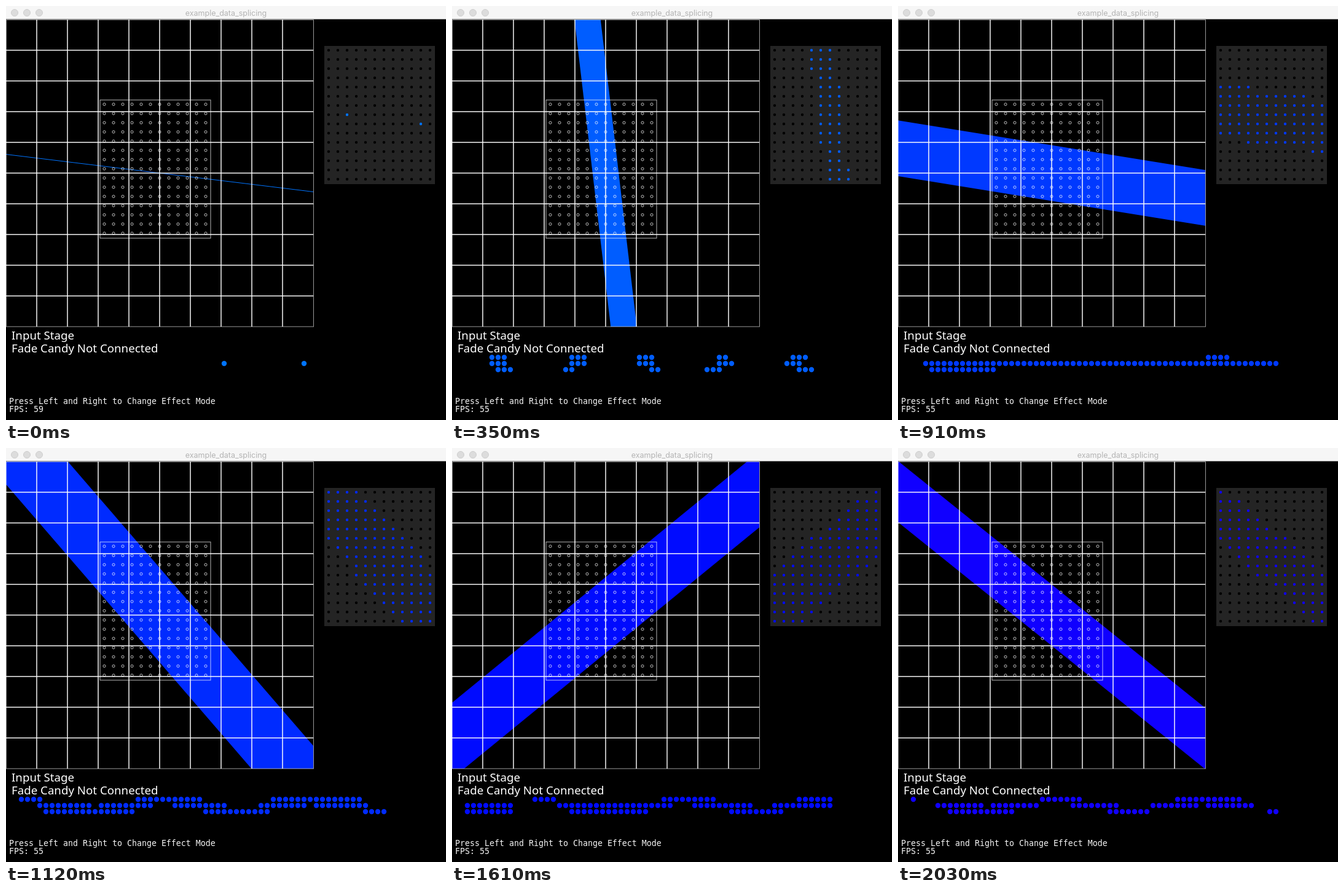
Recreate the animation shown at these times as an HTML page with a canvas. Size 716 px wide and 674 px high, loop 2100 ms.

```html
<!DOCTYPE html>
<html lang="en">
<head>
<meta charset="utf-8">
<title>example_data_splicing</title>
<style>
  html, body { margin: 0; width: 716px; height: 674px; overflow: hidden; background: #000; }
  canvas, svg { position: absolute; left: 0; top: 0; display: block; }
  .title { font: 12.5px Inter, Roboto, sans-serif; fill: #b4b4b4; text-anchor: middle; }
  .label { font: 18.7px "Noto Sans", "DejaVu Sans", sans-serif; fill: #fff; }
  .mono { font: 13.29px "DejaVu Sans Mono", "Noto Sans Mono", monospace; fill: #f4f4f4; }
</style>
</head>
<body>
<canvas width="716" height="674"></canvas>
<svg width="716" height="674">
  <rect width="716" height="21.5" fill="#f6f6f6"/>
  <g fill="#dcdcdc" stroke="#cecece">
    <circle cx="14" cy="11" r="5.5"/>
    <circle cx="34" cy="11" r="5.5"/>
    <circle cx="54" cy="11" r="5.5"/>
  </g>
  <text class="title" x="358" y="16">example_data_splicing</text>
  <text class="label" x="9" y="543">Input Stage</text>
  <text class="label" x="9" y="564">Fade Candy Not Connected</text>
  <text class="mono" x="5" y="648">Press Left and Right to Change Effect Mode</text>
  <text class="mono" x="5" y="661" id="fps">FPS: 59</text>
</svg>
<script>
const STEP = 70, STEPS = 30;
const COLS = 12, ROWS = 15, PITCH = 15;
const STAGE = { x: 0, y: 22, size: 500 };
const CENTER = { x: 250, y: 272 };

// [step, angle in degrees, thickness]
const KEYS = [
  [0, 6.96, 1], [5, 83.27, 42.2], [9, 135.95, 69.4], [16, 229.2, 100.5],
  [20, 282.9, 98.5], [25, 345.96, 92], [29, 398.8, 77.7]
];

const ctx = document.querySelector("canvas").getContext("2d");
const fps = document.getElementById("fps");

function slope(k, field) {
  const a = KEYS[Math.max(k - 1, 0)], b = KEYS[Math.min(k + 1, KEYS.length - 1)];
  return (b[field] - a[field]) / (b[0] - a[0]);
}

// Cubic Hermite curve through the keys
function sample(step, field) {
  let k = 0;
  while (k < KEYS.length - 2 && step >= KEYS[k + 1][0]) k++;
  const a = KEYS[k], b = KEYS[k + 1], span = b[0] - a[0];
  const u = (step - a[0]) / span, v = 1 - u;
  return a[field] * (1 + 2 * u) * v * v + slope(k, field) * span * u * v * v
       + b[field] * (3 - 2 * u) * u * u - slope(k + 1, field) * span * u * u * v;
}

function dot(x, y, r, color) {
  ctx.fillStyle = color;
  ctx.beginPath();
  ctx.arc(x, y, r, 0, 2 * Math.PI);
  ctx.fill();
}

function eachLed(fn) {
  for (let r = 0; r < ROWS; r++)
    for (let c = 0; c < COLS; c++) fn(c, r);
}

function drawBand(dx, dy, width, color) {
  const { x, y, size } = STAGE;
  ctx.save();
  ctx.beginPath();
  ctx.rect(x, y, size, size);
  ctx.clip();
  ctx.strokeStyle = color;
  ctx.lineWidth = width;
  ctx.beginPath();
  ctx.moveTo(CENTER.x - dx * 500, CENTER.y - dy * 500);
  ctx.lineTo(CENTER.x + dx * 500, CENTER.y + dy * 500);
  ctx.stroke();
  ctx.restore();
}

function drawGrid() {
  const { x, y, size } = STAGE;
  ctx.fillStyle = "rgba(255,255,255,.72)";
  for (let p = 50; p < size; p += 50) {
    ctx.fillRect(x + p - 1, y, 2, size);
    ctx.fillRect(x, y + p - 1, size, 2);
  }
  ctx.lineWidth = 1;
  ctx.strokeStyle = "rgba(255,255,255,.6)";
  ctx.strokeRect(x + .5, y + .5, size, size - .5);
  ctx.strokeStyle = "rgba(255,255,255,.72)";
  ctx.strokeRect(153, 153, 180, 225);
  eachLed((c, r) => {
    ctx.beginPath();
    ctx.arc(160 + c * PITCH, 160 + r * PITCH, 2.1, 0, 2 * Math.PI);
    ctx.stroke();
  });
}

function drawLeds(dx, dy, width, color) {
  ctx.fillStyle = "#242424";
  ctx.fillRect(518, 65, 180, 225);
  const reach = Math.max(width / 2, .8);
  eachLed((c, r) => {
    const px = 160 + c * PITCH - CENTER.x, py = 160 + r * PITCH - CENTER.y;
    const lit = Math.abs(px * dy - py * dx) < reach;
    dot(525 + c * PITCH, 72 + r * PITCH, 2.2, lit ? color : "#000");
    if (!lit) return;
    // The strip zigzags through the rows, five rows per line
    const k = (r % 5) * COLS + (r % 2 ? COLS - 1 - c : c);
    dot(25 + k * 10, 572 + Math.floor(r / 5) * 10, 4.2, color);
  });
}

function draw(step) {
  const angle = sample(step, 1) * Math.PI / 180;
  const dx = Math.cos(angle), dy = Math.sin(angle);
  const width = sample(step, 2);
  const shade = Math.round(116 - 4.55 * step);
  const color = `rgb(${Math.max(-shade, 0)},${Math.max(shade, 0)},255)`;
  ctx.clearRect(0, 0, 716, 674);
  drawBand(dx, dy, width, color);
  drawGrid();
  drawLeds(dx, dy, width, color);
  fps.textContent = step < 1 ? "FPS: 59" : "FPS: 55";
}

const start = performance.now();
function tick() {
  const elapsed = performance.now() - start;
  draw(Math.floor(elapsed / STEP) % STEPS);
  requestAnimationFrame(tick);
}
tick();
</script>
</body>
</html>
```
